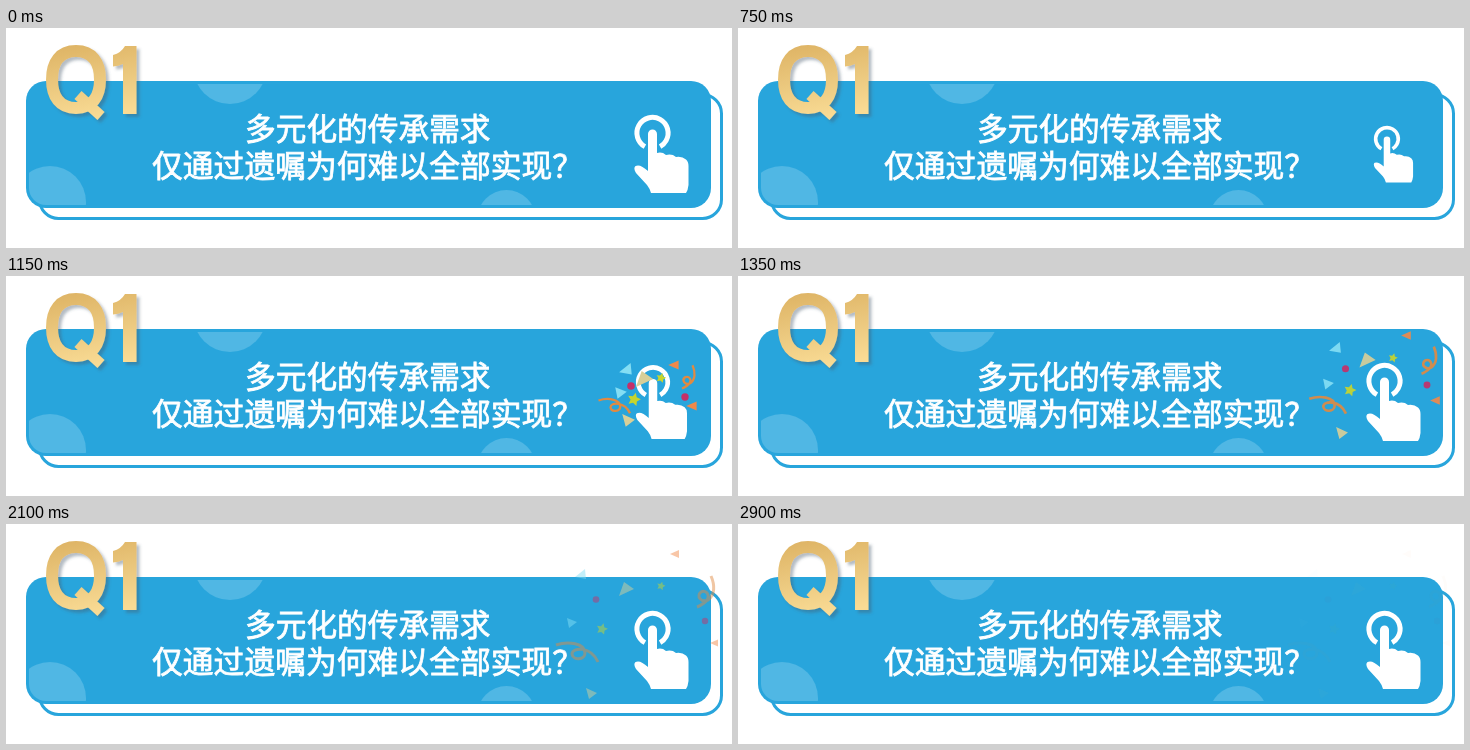
An HTML page with a canvas that plays this animation: 726x220 px, repeating every 3000 ms.

```html
<!DOCTYPE html>
<html lang="zh-CN">
<head>
<meta charset="utf-8">
<title>Q1</title>
<style>
html, body { margin: 0; width: 726px; height: 220px; overflow: hidden; background: #fff; }
svg, canvas { position: absolute; left: 0; top: 0; }
.ask {
  font: 500 30.7px "Noto Sans CJK SC", "Noto Sans CJK", "Noto Sans SC", sans-serif;
  fill: #fff; stroke: #fff; stroke-width: .8px;
}
</style>
</head>
<body>
<svg width="726" height="220" viewBox="0 0 726 220">
  <defs>
    <linearGradient id="gold" gradientUnits="userSpaceOnUse" x1="70" y1="17" x2="82" y2="90">
      <stop offset="0" stop-color="#dfb566"/>
      <stop offset=".5" stop-color="#ebc87e"/>
      <stop offset="1" stop-color="#f9db94"/>
    </linearGradient>
    <filter id="shade" filterUnits="userSpaceOnUse" x="30" y="5" width="120" height="100">
      <feDropShadow dx="3" dy="3" stdDeviation="1.8" flood-color="#42566a" flood-opacity=".4"/>
    </filter>
    <clipPath id="inner"><rect x="23" y="56" width="679" height="121" rx="17"/></clipPath>
  </defs>
  <rect x="33.5" y="66.500" width="682" height="124" rx="19" fill="#fff" stroke="#28a5dc" stroke-width="3"/>
  <rect x="20" y="53" width="685" height="127" rx="20" fill="#28a5dc"/>
  <g clip-path="url(#inner)" fill="#50b7e4">
    <circle cx="224" cy="39.4" r="36.6"/>
    <circle cx="44" cy="174" r="36"/>
    <circle cx="500.5" cy="191" r="29"/>
  </g>
  <g filter="url(#shade)" role="img" aria-label="Q1">
    <g fill="none" stroke="url(#gold)">
      <path stroke-width="12" d="M70 23C86 23 94 34 94 51.500S86 80 70 80S46 69 46 51.500S54 23 70 23Z"/>
      <path stroke-width="10.5" d="M72 67L95 88"/>
    </g>
    <path fill="url(#gold)" d="M107 27Q115 25 119 18H130.500V86H117V36Q112.500 38 107 38.500Z"/>
  </g>
  <text class="ask" x="239" y="112">多元化的传承需求</text>
  <text class="ask" x="146" y="149" style="font-size:30.8px">仅通过遗嘱为何难以全部实现？</text>
</svg>
<canvas id="stage" width="726" height="220"></canvas>
<script>
const ctx = document.getElementById('stage').getContext('2d');
const LOOP = 3000, STEP = 50;
const HAND = { x: 655.5, y: 126.5 };
const palm = new Path2D('M642 106A4.500 4.500 0 0 1 651 106V125Q656 123.500 660 127Q666 125.500 670 129Q676 128 680 131.500Q682.500 133.500 682.500 138V157Q682 162 680 165H645Q643.500 160 641 157L630 145Q627 140 629.500 138Q634 135.500 642 143Z');

const tri = (...p) => ({ path: new Path2D(`M${p[0]} ${p[1]}L${p[2]} ${p[3]}L${p[4]} ${p[5]}Z`) });
const dot = r => { const path = new Path2D(); path.arc(0, 0, r, 0, 7); return { path }; };
const curl = d => ({ path: new Path2D(d), line: true });
function star(r) {
  const path = new Path2D();
  for (let i = 0; i < 10; i++) {
    const a = i * Math.PI / 5 - 1.3, q = i % 2 ? r * .5 : r;
    path.lineTo(q * Math.cos(a), q * Math.sin(a));
  }
  path.closePath();
  return { path };
}

const ORANGE = '#f0894a', CYAN = '#84def4', SAND = '#d8cf98', LIME = '#c8d52c', PINK = '#c52f68', RUST = '#e08a42';
// shape, colour, early position, resting position
const pieces = [
  [tri(-5, 0, 4, -4, 4, 4), ORANGE, 668, 89, 669, 30],
  [tri(-6, 2, 4, -6, 5, 4), CYAN, 620, 94, 575, 51],
  [tri(-7, 7, -2, -7, 8, 0), SAND, 638, 103, 620, 65],
  [star(4.5), LIME, 655, 102, 655, 62],
  [dot(3.3), PINK, 625, 110, 590, 75.5],
  [tri(-5, -5, 5, -1, -3, 5), CYAN, 615, 117, 566, 99],
  [star(6), LIME, 628, 123.5, 596, 105],
  [curl('M-22-6C-10-10 7-8 7 2C7 9-5 10-6 3C-6-4 13-5 20 11'), RUST, 609, 129, 572, 127],
  [curl('M6-17C10-8 10 2 3 7C-4 10-9 3-4-1C2-4 7 4-1 10Q-5 13-8 14'), RUST, 682, 102, 699, 69],
  [dot(3.2), PINK, 679, 121, 699, 97],
  [tri(-5, 0, 4, -4, 4, 4), ORANGE, 686, 130, 709, 119],
  [tri(-5, -6, 6, -1, -2, 5), SAND, 622, 145, 585, 170]
];

function handScale(t) {
  if (t < 900) return 1 - .33 * t / 900;
  return Math.min(1, .67 + .33 * (t - 900) / 300);
}

function drawHand(s) {
  ctx.save();
  ctx.translate(HAND.x, HAND.y);
  ctx.scale(s, s);
  ctx.translate(-HAND.x, -HAND.y);
  ctx.fillStyle = ctx.strokeStyle = '#fff';
  ctx.lineWidth = 5;
  ctx.beginPath();
  ctx.arc(646.5, 105, 15.6, 2.08, 1.06);
  ctx.stroke();
  ctx.fill(palm);
  ctx.restore();
}

function drawConfetti(t) {
  const alpha = Math.min((t - 950) / 200, 1 - (t - 1200) / 1750, 1);
  if (alpha <= 0) return;
  const u = Math.min(1, (t - 1150) / 400);
  ctx.save();
  ctx.beginPath();
  ctx.rect(0, 0, 712, 220);
  ctx.clip();
  ctx.globalAlpha = alpha;
  for (const [shape, color, x0, y0, x1, y1] of pieces) {
    const s = shape.line ? .75 + .25 * u : 1.15 - .15 * u;
    ctx.save();
    ctx.translate(x0 + (x1 - x0) * u, y0 + (y1 - y0) * u);
    ctx.scale(s, s);
    ctx.fillStyle = ctx.strokeStyle = color;
    ctx.lineWidth = 3;
    if (shape.line) ctx.stroke(shape.path);
    else ctx.fill(shape.path);
    ctx.restore();
  }
  ctx.restore();
}

function draw(t) {
  ctx.clearRect(0, 0, 726, 220);
  drawHand(handScale(t));
  drawConfetti(t);
}

const start = performance.now();
function tick() {
  const t = (performance.now() - start) % LOOP;
  draw(Math.min(2900, Math.floor(t / STEP) * STEP));
  requestAnimationFrame(tick);
}
tick();
</script>
</body>
</html>
```
